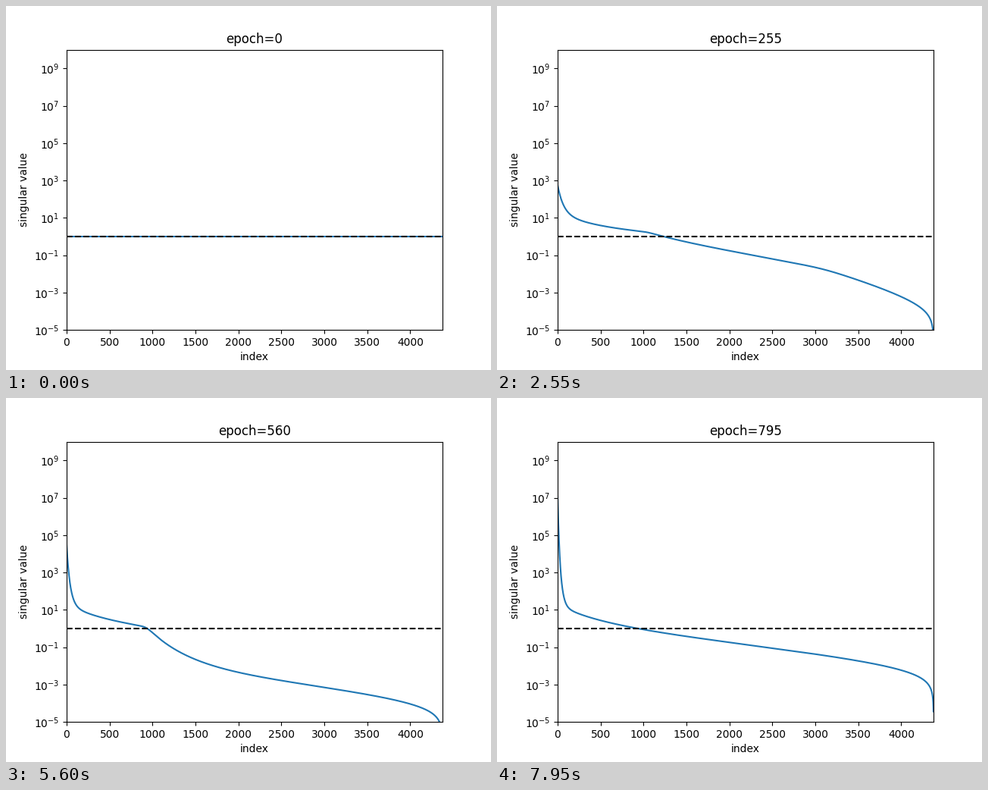
Write a matplotlib script that moves like this. It is 640 px wide and 480 px high and loops after 8000 ms.

```python
import numpy as np
import matplotlib.pyplot as plt
from matplotlib.animation import FuncAnimation

FRAMES, INTERVAL, EPOCH_STEP = 160, 50, 5
SIZE = 4376
index = np.arange(SIZE)
x = index / 1000


def softplus(z, width):
    return width * np.logaddexp(0, z / width)


def spectrum(t):
    """log10 of the sorted singular values at epoch t."""
    ramp = 1 - np.exp(-t / 45)

    # leading values: a spike that sharpens about index 80
    peak = 0.75 * np.exp(t / 390)
    spike = (0.44 * (peak / 0.44) ** (1 - index / 80)
             + 0.2 * np.exp(-index / 200))

    # slowly tilting body that falls off at the last indices
    slope = 0.4 - min(0.39, 0.5 * max(0, 1 - t / 690))
    body = (0.22 + 0.9 * np.exp(-index / 700) - slope * x
            + 0.8 * np.log10(1 - index / SIZE))

    # bulk that sinks behind a knee, then rises again
    knee = 885 + 440 * np.exp(-t / 250)
    behind = softplus(index - knee, 25)
    depth = np.interp(t, [185, 320, 420, 560, 700, 795],
                      [0, 0.3, 0.92, 1.88, 1.02, 0])
    width = np.interp(t, [560, 700], [470, 85])
    tilt = np.interp(t, [0, 185, 320, 420, 560, 700],
                     [0.25, 0.46, 0.62, 0.46, 0.1, 0])
    bend = np.interp(t, [185, 320, 560], [1, 0.15, 0])
    sink = (depth * (1 - np.exp(-behind / width)) + tilt * behind / 1000
            + bend * softplus(index - 3100, 100) / 1000)

    return ramp * (spike + body - sink)


fig, ax = plt.subplots(figsize=(6.4, 4.8), dpi=100)
line, = ax.semilogy(index, np.ones(SIZE))
ax.axhline(1, color="black", linestyle="--")
ax.set_xlim(0, SIZE)
ax.set_ylim(1e-5, 1e10)
ax.set_yticks(10.0 ** np.arange(-5, 10, 2))
ax.minorticks_off()
ax.set_xlabel("index")
ax.set_ylabel("singular value")
title = ax.set_title("epoch=0")


def update(i):
    epoch = i * EPOCH_STEP
    line.set_ydata(10 ** spectrum(epoch))
    title.set_text(f"epoch={epoch}")
    return line, title


anim = FuncAnimation(fig, update, frames=FRAMES, interval=INTERVAL,
                     repeat=True, repeat_delay=0)
plt.show()
```
